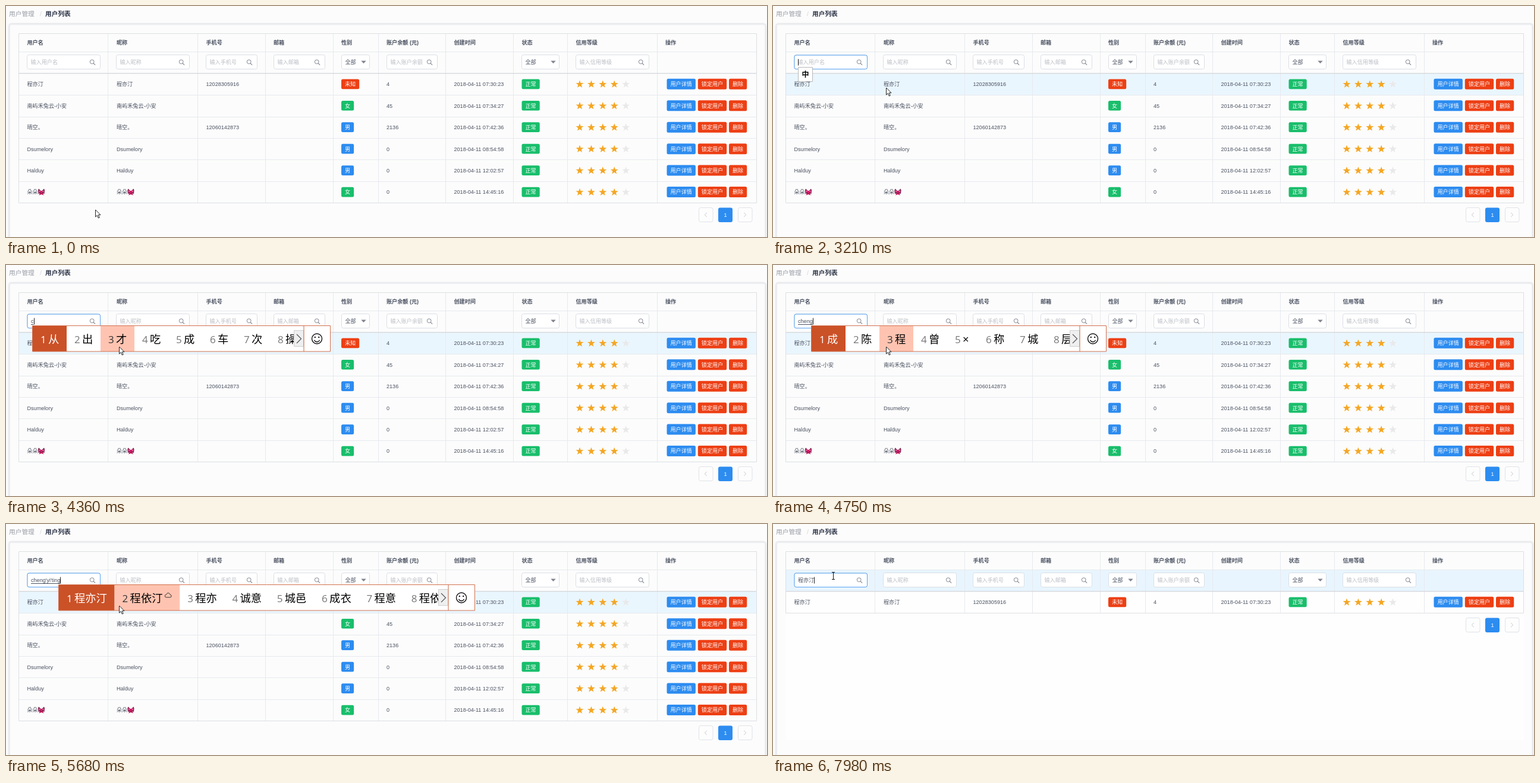
An HTML page with a canvas that plays this animation: 1280x390 px, repeating every 8000 ms.

```html
<!DOCTYPE html>
<html lang="zh-CN">
<head>
<meta charset="utf-8">
<title>用户列表</title>
<style>
html, body { margin: 0; width: 100%; height: 100%; overflow: hidden; background: #fcfcfc; }
canvas { display: block; width: 1280px; height: 390px; }
</style>
</head>
<body>
<canvas id="stage" width="1280" height="390"></canvas>
<script>
const ctx = document.getElementById('stage').getContext('2d');
const LOOP = 8000;
const SANS = '"Liberation Sans", "Noto Sans CJK SC", sans-serif';
const IME_FONT = '"Open Sans", "Noto Sans CJK SC", sans-serif';
const BLUE = '#2d8cf0', RED = '#ed3f14', GREEN = '#19be6b', INK = '#495060';
const NAME = '程亦汀';
const SIZE = 9.1;

const COLS = [21, 171, 322, 436, 550, 626, 739, 853, 944, 1095, 1262];
const HEADS = ['用户名', '昵称', '手机号', '邮箱', '性别', '账户余额 (元)', '创建时间', '状态', '信用等级', '操作'];
const TEXT_X = [35.5, 186, 336.5, 450, 564, 640, 753.5, 867.5, 958.5, 1109];
const INPUTS = [[35, 158, '用户名'], [185, 308, '昵称'], [336, 422, '手机号'], [450, 536, '邮箱'],
  [640, 725, '账户余额'], [958, 1081, '信用等级']];
const SELECTS = [[564, 611], [867, 930]];
const GENDER = { '未知': RED, '女': GREEN, '男': BLUE };
const USERS = [
  [NAME, '12028305916', '未知', '4', '07:30:23'],
  ['南屿禾兔云-小安', '', '女', '45', '07:34:27'],
  ['晴空。', '12060142873', '男', '2136', '07:42:36'],
  ['Dsumelory', '', '男', '0', '08:54:58'],
  ['Halduy', '', '男', '0', '12:02:57'],
  ['朵朵', '', '女', '0', '14:45:16', true]
];

// Typed text over time; '' shows the placeholder
const TYPING = [[3390, 'c'], [3530, 'ch'], [4030, 'c'], [4210, ''], [4360, 'c'], [4440, 'ch'],
  [4520, 'che'], [4600, 'chen'], [4690, 'cheng'], [4930, "cheng'y"], [5200, "cheng'yi"],
  [5410, "cheng'yi't"], [5500, "cheng'yi'ti"], [5590, "cheng'yi'tin"], [5680, "cheng'yi'ting"], [5930, NAME]];
const FULL = '程亦汀 程依汀☁ 程亦 诚意 城邑 成衣 程意 程依';
const WORDS = {
  'c': '从 出 才 吃 成 车 次 操',
  'ch': '出 吃 车 成 长 处 穿 传',
  'che': '车 撤 扯 彻 澈 掣 坼 砗',
  'chen': '陈 晨 沉 臣 称 趁 尘 衬',
  'cheng': '成 陈 程 曾 × 称 城 层',
  "cheng'y": '成员 诚意 程亦 成因 承压 城邑 呈样 成业',
  "cheng'yi": '诚意 成衣 程亦 成一片 城邑 成一家 承意 程依然'
};
// Pointer path: time, x, y
const PATH = [[0, 150, 344], [59, 150, 344], [120, 127, 344], [930, 127, 344], [1720, 89, 98],
  [1960, 89, 98], [1990, 90, 99], [2210, 90, 99], [2690, 190, 138], [7410, 190, 138], [7980, 101, 87], [8000, 101, 87]];

const clamp = v => Math.max(0, Math.min(1, v));
const ramp = (t, a, b) => clamp((t - a) / (b - a));
const ease = k => k * k * (3 - 2 * k);

function text(s, x, cy, color = INK, size = SIZE, weight = '', family = SANS) {
  ctx.font = `${weight} ${size}px ${family}`;
  ctx.fillStyle = color;
  ctx.fillText(s, x, cy + size * 0.37);
  return ctx.measureText(s).width;
}

function box(x, y, w, h, r, fill, stroke) {
  ctx.beginPath();
  ctx.roundRect(x, y, w, h, r);
  if (fill) { ctx.fillStyle = fill; ctx.fill(); }
  if (stroke) { ctx.strokeStyle = stroke; ctx.lineWidth = 1; ctx.stroke(); }
}

function rect(x, y, w, h, color) {
  ctx.fillStyle = color;
  ctx.fillRect(x, y, w, h);
}

function line(points, color, width = 1) {
  ctx.beginPath();
  points.forEach(([x, y]) => ctx.lineTo(x, y));
  ctx.strokeStyle = color;
  ctx.lineWidth = width;
  ctx.stroke();
}

function shape(points, color) {
  ctx.beginPath();
  points.forEach(([x, y]) => ctx.lineTo(x, y));
  ctx.closePath();
  ctx.fillStyle = color;
  ctx.fill();
}

function star(cx, cy, color) {
  const pts = [];
  for (let i = 0; i < 10; i++) {
    const r = i % 2 ? 2.8 : 6.8, a = Math.PI * (i / 5 - 0.5);
    pts.push([cx + r * Math.cos(a), cy + r * Math.sin(a)]);
  }
  shape(pts, color);
}

function bow(x, cy) {
  shape([[x + 4, cy], [x + 1.5, cy + 5.5], [x + 5.5, cy + 4], [x + 9.5, cy + 5.5], [x + 7, cy]], '#c2185b');
  for (const s of [-1, 1]) {
    const c = x + 5.5;
    shape([[c, cy - 1], [c + s * 4.5, cy - 5.5], [c + s * 5.5, cy - 3], [c + s * 5, cy + 3], [c, cy + 1.5]], '#6d0f3a');
    shape([[c + s, cy - 0.7], [c + s * 4, cy - 4], [c + s * 4.2, cy + 1.7]], '#f0569c');
  }
  box(x + 4, cy - 2, 3, 4, 1, '#d81b6a');
}

function tag(s, x, cy, color, h = 16.7) {
  box(x, cy - h / 2, [...s].length * SIZE + 12, h, 2.5, color);
  text(s, x + 6, cy, '#fff');
}

function searchIcon(x, y) {
  ctx.beginPath();
  ctx.arc(x - 0.8, y - 0.8, 3.4, 0, 7);
  ctx.strokeStyle = '#80848f';
  ctx.lineWidth = 1;
  ctx.stroke();
  line([[x + 1.6, y + 1.6], [x + 4.6, y + 4.6]], '#80848f', 1.2);
}

function drawPage() {
  rect(0, 0, 1280, 390, '#fcfcfc');
  text('用户管理', 5, 13, '#999da6', 10.7);
  text('/', 57, 13, '#d3d6db', 10.7);
  text('用户列表', 66, 13, '#2b3346', 10.7, 'bold');
  ctx.save();
  ctx.shadowColor = 'rgba(0,0,0,.14)';
  ctx.shadowBlur = 3;
  box(5.5, 30.5, 1272, 380, 3, '#fcfcfc', '#e3e6ec');
  ctx.restore();
}

function drawFilters(typed, t) {
  for (const [x0, x1, label] of INPUTS) {
    const first = x0 === 35;
    box(x0 + 0.5, 82.5, x1 - x0, 24, 3, '#fff', '#dadee4');
    if (first) {
      const glow = ramp(t, 1560, 1780);
      box(x0 + 1, 83, x1 - x0 - 0.5, 23.5, 3, null, `rgba(87,163,243,${glow})`);
    }
    if (!first || !typed) text('输入' + label, x0 + 6.5, 95, '#bbbec4');
    searchIcon(x1 - 12.5, 95);
  }
  for (const [x0, x1] of SELECTS) {
    box(x0 + 0.5, 82.5, x1 - x0, 24, 3, '#fff', '#dadee4');
    text('全部', x0 + 6.5, 95);
    const a = x1 - 9.5;
    shape([[a - 4.2, 92.5], [a + 4.2, 92.5], [a, 97]], '#80848f');
  }
}

function drawRow([name, phone, gender, money, time, hasBow], cy) {
  for (const x of TEXT_X.slice(0, 2)) {
    const w = text(name, x, cy);
    if (hasBow) bow(x + w + 0.3, cy);
  }
  text(phone, TEXT_X[2], cy);
  tag(gender, 564, cy, GENDER[gender]);
  text(money, TEXT_X[5], cy);
  text('2018-04-11 ' + time, TEXT_X[6], cy);
  tag('正常', 867.5, cy, GREEN);
  for (let i = 0; i < 5; i++) star(965 + i * 19.4, cy + 0.4, i < 4 ? '#f5a623' : '#e9e9e9');
  tag('用户详情', 1111.5, cy, BLUE, 18);
  tag('锁定用户', 1163.8, cy, RED, 18);
  tag('删除', 1216, cy, RED, 18);
}

function drawPager(cy) {
  for (const [x, dir] of [[1165, -1], [1231, 1]]) {
    box(x + 0.5, cy - 12, 23.5, 24, 3, '#fdfdfd', '#dfe2e8');
    const c = x + 12;
    line([[c - dir * 1.8, cy - 3.5], [c + dir * 1.8, cy], [c - dir * 1.8, cy + 3.5]], '#c3c7ce');
  }
  box(1198, cy - 12, 24, 24.5, 3, BLUE);
  text('1', 1207.5, cy, '#fff');
}

function drawTable(t, typed) {
  const rows = t < 6770 ? USERS : USERS.slice(0, 1);
  const rowY = i => Math.round(113.6 + i * 36.45);
  const bottom = rowY(rows.length);
  if (rows.length === 1) rect(22, 114, 1241, 251, '#fefefe');

  const filterHover = t < 5000 ? ramp(t, 1500, 1700) - ramp(t, 2330, 2530) : ramp(t, 7740, 7940);
  const rowHover = t < 6770 ? ramp(t, 2450, 2650) : ramp(t, 6860, 6980) - ramp(t, 7660, 7860);
  rect(22, 78, 1240, 35, `rgba(232,245,254,${filterHover})`);
  rect(22, 114, 1240, 36, `rgba(234,246,254,${rowHover})`);

  for (const x of COLS.slice(1, -1)) rect(x, 47, 1, bottom - 47, '#e6e9ee');
  rect(22, 77, 1240, 1, '#e6e9ee');
  for (let i = 1; i < rows.length; i++) rect(22, rowY(i), 1240, 1, '#e6e9ee');
  rect(21, 113, 1242, 1.4, '#d6d8dc');
  box(21.5, 46.5, 1241, bottom - 46, 0, null, '#dcdfe3');

  HEADS.forEach((h, i) => text(h, TEXT_X[i], 62, INK, SIZE, 'bold'));
  drawFilters(typed, t);
  rows.forEach((u, i) => drawRow(u, 131.8 + i * 36.45));
  drawPager(bottom + 20.5);
}

function caretOn(t, composing) {
  if (composing) return true;
  if (t < 5930) return t >= 1720 && !(t >= 2690 && t < 3205);
  return t < 6430 || (t >= 6920 && t < 7450) || t >= 7970;
}

function cloud(x, y) {
  ctx.beginPath();
  ctx.arc(x + 3, y + 5.5, 2.3, Math.PI / 2, Math.PI * 1.5);
  ctx.arc(x + 6.3, y + 3.5, 3, Math.PI * 1.1, Math.PI * 1.9);
  ctx.arc(x + 9.4, y + 5.6, 2.2, -Math.PI / 2, Math.PI / 2);
  ctx.closePath();
  ctx.strokeStyle = '#333';
  ctx.lineWidth = 1;
  ctx.stroke();
}

function smiley(x, y) {
  ctx.strokeStyle = '#111';
  ctx.lineWidth = 1.4;
  ctx.beginPath();
  ctx.arc(x, y, 8.5, 0, 7);
  ctx.stroke();
  ctx.beginPath();
  ctx.arc(x, y + 0.5, 4.8, 0.35, Math.PI - 0.35);
  ctx.stroke();
  for (const s of [-1, 1]) {
    ctx.beginPath();
    ctx.arc(x + s * 3.2, y - 2.6, 1.2, 0, 7);
    ctx.fillStyle = '#111';
    ctx.fill();
  }
}

function drawCandidates(list, left, pointerX) {
  const em = 18.3, top = 103, h = 43, cy = 125.5;
  const items = list.split(' ').map(s => {
    const word = s.replace('☁', ''), hasCloud = s !== word;
    const w = 38.7 + (word === '×' ? 13.3 : word.length * em) + (hasCloud ? 16 : 0);
    return { word, hasCloud, w };
  });
  const end = Math.round(left + items.reduce((sum, i) => sum + i.w, 0));
  rect(left, top, end + 44 - left, h, '#fff');
  ctx.save();
  ctx.beginPath();
  ctx.rect(left, top, end - left, h);
  ctx.clip();
  let x = left;
  items.forEach(({ word, hasCloud, w }, i) => {
    const hover = pointerX >= x && pointerX < x + w;
    if (i === 0) rect(x, top, w, h, '#cb5127');
    else if (hover) rect(x, top, w, h, '#ffc4b1');
    text(String(i + 1), x + 13, cy + 0.5, i === 0 ? '#fff' : hover ? '#333' : '#767676', 17, '', IME_FONT);
    text(word, x + 26, cy, i === 0 ? '#fff' : '#000', em, '', IME_FONT);
    if (hasCloud) cloud(x + 84, 116);
    x += w;
  });
  ctx.restore();
  box(end - 16.5, 110.5, 16, 27, 0, '#efefef', '#cfcfcf');
  line([[end - 12, 117], [end - 4.5, 124.5], [end - 12, 132]], '#555', 1.2);
  rect(end - 0.5, top, 1, h, '#cb6a47');
  smiley(end + 22, 124.5);
  box(left - 0.5, 102.5, end + 45 - left, 43.5, 0, null, '#d2704d');
}

function drawInput(t, typed, pointerX) {
  const composing = typed !== '' && typed !== NAME;
  const w = typed ? text(typed, 42, 95, INK) : 0;
  const caret = Math.round(42 + w);
  if (composing) rect(42, 100, w, 1, '#495060');
  if (caretOn(t, composing)) rect(caret, 89.5, 1, 11, '#222');
  if (composing) drawCandidates(WORDS[typed] || FULL, caret - 2, pointerX);
  if (t >= 2210 && t < 3390) {
    box(42.5, 103.5, 24, 24, 0, '#fff', '#b8b8b8');
    text('中', 48.5, 115.5, '#000', 12, 'bold', IME_FONT);
  }
}

function pointerAt(t) {
  const i = PATH.findIndex(p => p[0] > t);
  const a = PATH[i - 1], b = PATH[i];
  const k = ease((t - a[0]) / (b[0] - a[0]));
  return [a[1] + (b[1] - a[1]) * k, a[2] + (b[2] - a[2]) * k];
}

function drawPointer(x, y) {
  x = Math.round(x);
  y = Math.round(y);
  if (x > 35 && x < 158 && y > 82 && y < 107) {
    line([[x + 0.5, y - 5], [x + 0.5, y + 6]], '#111');
    for (const s of [y - 5.5, y + 6.5]) line([[x - 2, s], [x + 3, s]], '#111');
    return;
  }
  const tip = [[0, 0], [0, 12], [2.8, 9.4], [4.8, 14], [6.7, 13.2], [4.8, 8.7], [8.5, 8.7]];
  const pts = tip.map(([dx, dy]) => [x + 0.5 + dx, y + dy]);
  shape(pts, '#fff');
  line([...pts, pts[0]], '#222');
}

function frame() {
  const t = performance.now() % LOOP;
  const typed = TYPING.reduce((s, [at, v]) => t >= at ? v : s, '');
  const [px, py] = pointerAt(t);
  drawPage();
  drawTable(t, typed);
  drawInput(t, typed, px);
  drawPointer(px, py);
  requestAnimationFrame(frame);
}
frame();
</script>
</body>
</html>
```
